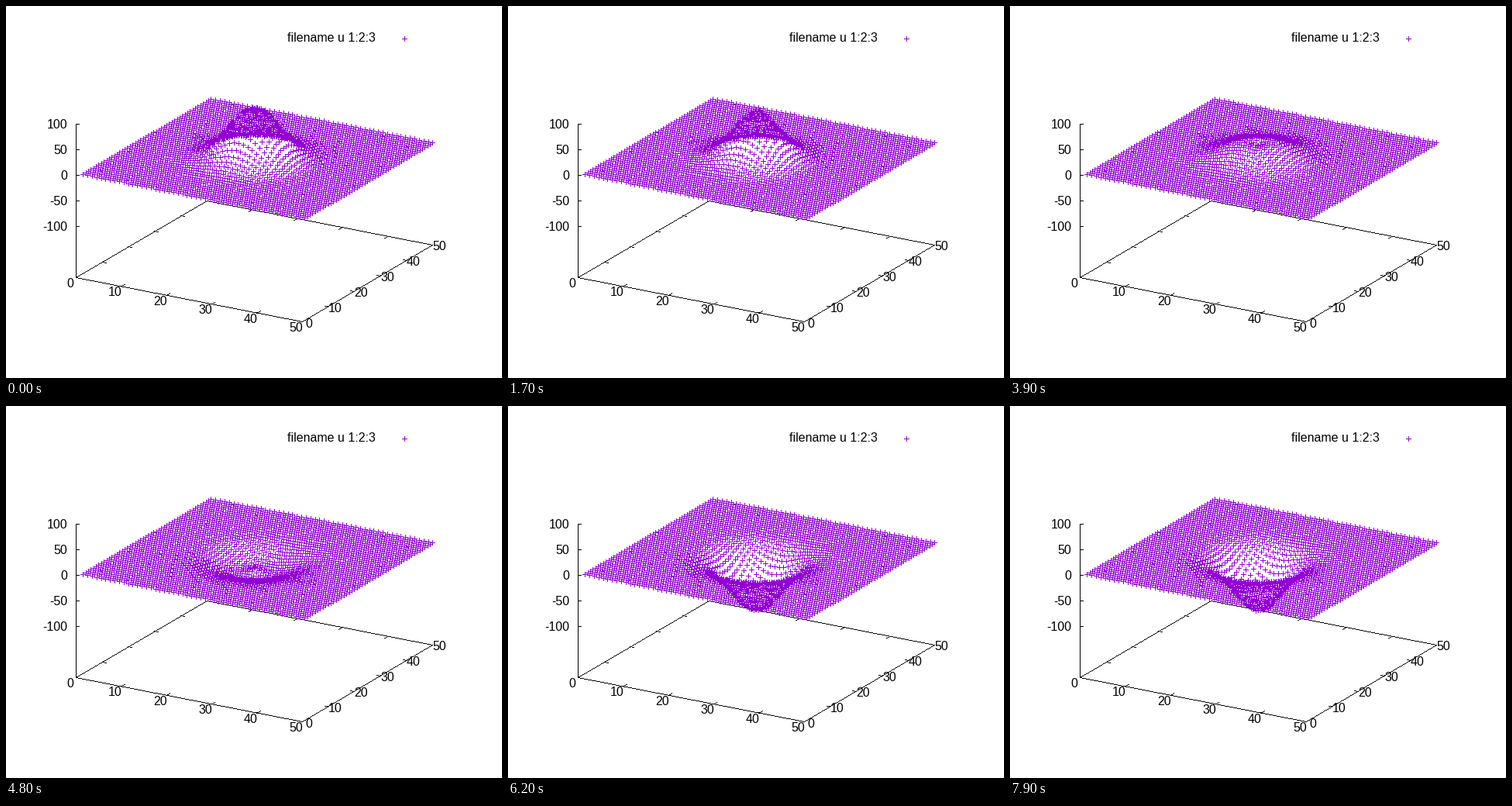
Write a matplotlib script that moves like this. It is 640 px wide and 480 px high and loops after 8000 ms.

```python
import numpy as np
import matplotlib.pyplot as plt
from matplotlib.animation import FuncAnimation

W, H, DPI = 640, 480, 100
PX = 72 / DPI                      # one pixel in points
VIOLET = (0x94, 0x00, 0xD3)

# View turned by 30 degrees and tilted by 60
C, S = np.cos(np.radians(30)), np.sin(np.radians(30))
ORIGIN = np.array([90.0, 350.0])   # screen place of (0, 0) on the base
SCALE = np.array([337, 229.5]) / 50
EX = SCALE * [C, S * 0.5]          # one unit of x
EY = SCALE * [S, -C * 0.5]         # one unit of y
LIFT, ZSCALE = 132, 0.66           # height of z = 0, pixels per z unit

AMP, SIGMA, CENTRE = 100, 5.0, 25
OMEGA, PHASE, LAG = 0.36, 0.19, 0.05


def base(x, y):
    return ORIGIN + x * EX + y * EY


fig = plt.figure(figsize=(W / DPI, H / DPI), dpi=DPI, facecolor="white")
ax = fig.add_axes([0, 0, 1, 1])
ax.axis("off")
frame = np.full((H, W, 3), 255, dtype=np.uint8)


def pixel(v):
    return np.floor(np.asarray(v) + 0.5).astype(int)


def line(p, q):
    """One-pixel line without smoothing."""
    p, q = pixel(p), pixel(q)
    n = np.abs(q - p).max() + 1
    cols, rows = (pixel(np.linspace(a, b, n)) for a, b in zip(p, q))
    frame[rows, cols] = 0


def tick(p, direction, size=5):
    line(p, p + size * direction / np.hypot(*direction))


def label(x, y, text, ha="center"):
    ax.text(x, y, text, ha=ha, va="baseline", color="black",
            family="Liberation Sans", fontsize=16 * PX, zorder=3)


# Base frame and z axis
corners = [base(0, 0), base(50, 0), base(50, 50), base(0, 50)]
for p, q in zip(corners, corners[1:] + corners[:1]):
    line(p, q)
line(ORIGIN, ORIGIN - [0, 198])

for v in range(0, 51, 10):
    front, back = base(v, 0), base(v, 50)
    left, right = base(0, v), base(50, v)
    if 0 < v < 50:
        tick(front, EY)
        tick(back, -EY)
        tick(left, EX)
        tick(right, -EX)
    label(front[0] - 7.5, front[1] + 13, str(v))
    label(right[0] + 9, right[1] + 7.5, str(v))

for z in range(-100, 101, 50):
    y = ORIGIN[1] - LIFT - ZSCALE * z
    line((90, y), (94, y))
    label(79.5, y + 6, str(z), ha="right")

label(363, 46, "filename u 1:2:3", ha="left")

# Grid of points; the swing lags a little further from the centre
gx, gy = np.meshgrid(np.arange(1, 51), np.arange(1, 51))
sx = ORIGIN[0] + gx * EX[0] + gy * EY[0]
sy = ORIGIN[1] + gx * EX[1] + gy * EY[1] - LIFT
radius = np.hypot(gx - CENTRE, gy - CENTRE)
bump = AMP * np.exp(-radius ** 2 / (2 * SIGMA ** 2))


def draw(step):
    z = bump * np.cos(OMEGA * step + PHASE - LAG * radius)
    col = np.append(pixel(sx), 514)
    row = np.append(pixel(sy - ZSCALE * z), 42)
    img = frame.copy()
    for d in range(-3, 4):
        img[row, col + d] = VIOLET
        img[row + d, col] = VIOLET
    return img


picture = ax.imshow(draw(0), extent=(0, W, H, 0), aspect="auto",
                    interpolation="nearest")
ax.set_xlim(0, W)
ax.set_ylim(H, 0)


def update(i):
    picture.set_data(draw(max(i - 1, 0)))
    return (picture,)


anim = FuncAnimation(fig, update, frames=80, interval=100,
                     repeat=True, repeat_delay=0, blit=False)
plt.show()
```
